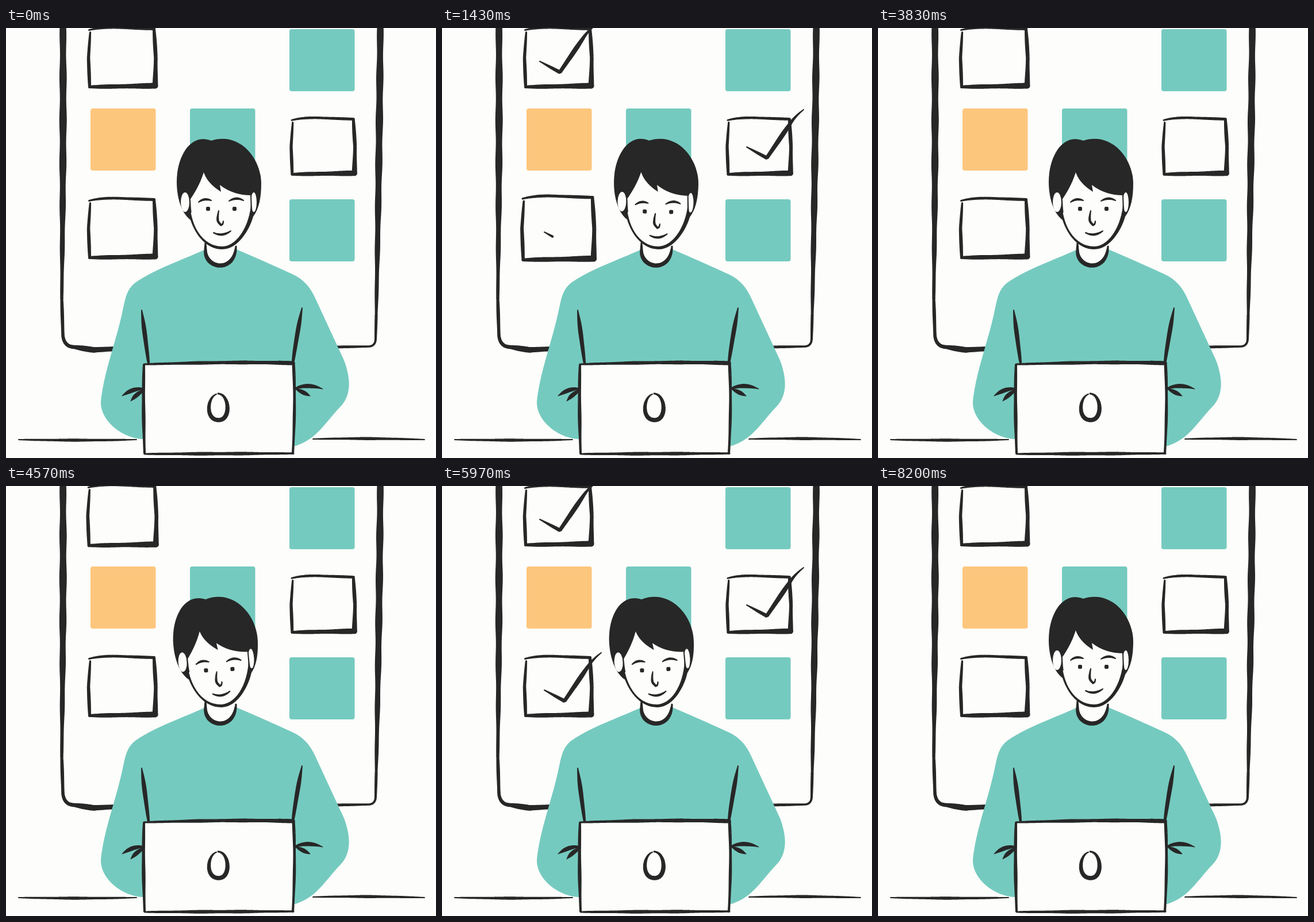
These frames come from a looping animation (748 px wide and 748 px high, 8230 ms). An HTML page:

```html
<!DOCTYPE html>
<html lang="en">
<head>
<meta charset="utf-8">
<title>Checking off tasks</title>
<style>
  html, body { margin: 0; width: 100%; height: 100%; overflow: hidden; background: #fdfdfb; }
  svg { display: block; width: 100%; height: 100%; }
</style>
</head>
<body>
<svg id="stage" viewBox="0 0 748 748"></svg>
<script>
const INK = '#272727', PAPER = '#fdfdfb', TEAL = '#75cabf', ORANGE = '#fdc67d';
const CYCLE = 4115, STAGGER = 400, DRAW = 330;
const stage = document.getElementById('stage');

function add(parent, tag, attrs = {}) {
  const node = document.createElementNS('http://www.w3.org/2000/svg', tag);
  for (const key in attrs) node.setAttribute(key, attrs[key]);
  parent.append(node);
  return node;
}
const shape = (parent, d, fill) => add(parent, 'path', { d, fill });
const note = (x, y, fill) => add(stage, 'rect', { x, y, width: 113.5, height: 108, rx: 4, fill });

// Ink line along a path: width swells from start to middle to end, with a slight waver.
// part draws only the first share of its length.
const probe = document.createElementNS('http://www.w3.org/2000/svg', 'path');
function inkLine(d, start, middle, end, part = 1) {
  probe.setAttribute('d', d);
  const length = probe.getTotalLength();
  const steps = Math.max(4, Math.ceil(length * part / 3));
  let out = '', last;
  for (let i = 0; i <= steps; i++) {
    const u = part * i / steps;
    const { x, y } = probe.getPointAtLength(u * length);
    const tip = u < 0.5 ? start : end;
    const width = (tip + (middle - tip) * Math.sin(Math.PI * u)) * (1 + 0.08 * Math.sin(u * length / 12));
    const r = width / 2;
    out += `M${x - r} ${y}a${r} ${r} 0 1 0 ${2 * r} 0a${r} ${r} 0 1 0 ${-2 * r} 0Z`;
    if (last) {
      const gap = Math.hypot(x - last.x, y - last.y) || 1;
      const nx = (last.y - y) / gap, ny = (x - last.x) / gap, q = last.r;
      out += `M${last.x + nx * q} ${last.y + ny * q}L${x + nx * r} ${y + ny * r}`
           + `L${x - nx * r} ${y - ny * r}L${last.x - nx * q} ${last.y - ny * q}Z`;
    }
    last = { x, y, r };
  }
  return out;
}
const ink = (parent, d, start, middle, end) => shape(parent, inkLine(d, start, middle, end), INK);

function drawBoard() {
  ink(stage, 'M98 -160Q101 150 97 470', 8, 12, 5);
  ink(stage, 'M97 470L99 535Q101 554 118 555', 5, 6, 6);
  ink(stage, 'M112 554L152 560L190 558', 5, 10, 8);
  ink(stage, 'M652 -160Q651 150 644 500', 8, 12, 5);
  ink(stage, 'M644 500L643 540Q643 554 630 554L570 555', 5, 4, 5);
  note(147, 140, ORANGE);
  note(320, 140, TEAL);
  note(493, 2, TEAL);
  note(493, 298, TEAL);
}

function drawBox() {
  const box = add(stage, 'g');
  ink(box, 'M-58 -48Q-35 -54 0 -52L55 -50', 3, 5, 5);
  ink(box, 'M55 -50L58 0L57 49', 5, 7, 9);
  ink(box, 'M57 49L-57 51', 10, 8, 5);
  ink(box, 'M-57 51L-59 0L-56 -44', 5, 6, 3);
  return box;
}

function drawBody() {
  ink(stage, 'M22 716Q130 718 227 716', 2, 5, 2);
  ink(stage, 'M534 715Q630 713 728 716', 2, 5, 2);
  shape(stage, `M345 386C300 406 258 420 225 443C208 456 207 475 202 496C190 550 170 600 165 650
    C164 685 205 715 240 715L503 727C540 716 552 690 585 655C600 636 600 610 588 578
    L538 470C528 448 516 437 500 429Q450 406 403 386Z`, TEAL);
  const neck = 'M347 374L347 390C350 420 398 425 400 380';
  shape(stage, neck, PAPER);
  ink(stage, neck, 3, 8, 3);
  ink(stage, 'M236 491L248 583', 2, 8, 4);
  ink(stage, 'M515 487Q504 545 499 583', 2, 8, 4);
  ink(stage, 'M202 640Q222 626 238 628', 1, 7, 4);
  ink(stage, 'M217 649Q226 638 238 631', 1, 7, 4);
  ink(stage, 'M503 627Q525 618 551 628', 3, 7, 1);
  ink(stage, 'M505 628L529 640', 3, 7, 1);
}

function drawLaptop() {
  shape(stage, 'M240 584L500 582L500 740L242 740Z', PAPER);
  ink(stage, 'M240 586Q238 650 241 740', 4, 6, 4);
  ink(stage, 'M240 585Q400 580 499 583', 3, 6, 7);
  ink(stage, 'M500 583Q504 650 499 740', 5, 5, 4);
  ink(stage, 'M242 741L500 740', 3, 6, 3);
  ink(stage, 'M366 637C350 642 346 682 370 682C392 682 389 637 369 636', 2, 8, 3);
}

function drawHead() {
  const head = add(stage, 'g');
  shape(head, `M357 196C320 182 297 225 297 268C297 295 305 322 321 334C330 362 350 385 376 385
    C404 385 424 350 430 328C440 315 444 295 444 271C444 225 405 180 357 196Z`, INK);
  for (const [cx, rx] of [[311.5, 7.5], [431, 5]])
    add(head, 'ellipse', { cx, cy: 303, rx, ry: 17, fill: PAPER });
  shape(head, `M344 251C338 270 330 284 320 299C319 340 340 380 376 380C406 379 428 335 427 291
    Q395 291 372 273L374 285Q350 270 344 251Z`, PAPER);
  ink(head, 'M320 299L321 320', 2, 2, 3);
  ink(head, 'M426 291L427 319', 2, 2, 3);
  const face = add(head, 'g');
  ink(face, 'M335 303Q345 295 357 300', 2, 4, 2);
  ink(face, 'M388 301Q401 293 413 300', 2, 4, 2);
  for (const x of [348, 394])
    add(face, 'rect', { x, y: 311, width: 7, height: 7, rx: 2, fill: INK });
  ink(face, 'M370 318Q367 332 369 337L374 343Q378 342 378 336', 2, 4, 2);
  ink(face, 'M361 356Q376 364 391 353', 2, 4, 2);
  return { head, face };
}

drawBoard();
const CHECK = 'M178 355L213 374L256 311Q264 300 277 290';
const tasks = [
  { x: 202.5, y: 51.5, size: 1, tickAt: '-8 -297' },
  { x: 552, y: 206, size: 0.95, tickAt: '352 -148' },
  { x: 202.5, y: 348.5, size: 1, tickAt: '0 0' }
].map((task, i) => ({
  ...task,
  start: 559 + STAGGER * i,
  clear: 2200 + STAGGER * i,
  box: drawBox(),
  tick: add(stage, 'path', { fill: INK, transform: `translate(${task.tickAt})` })
}));
drawBody();
drawLaptop();
const { head, face } = drawHead();

function ease(t, from, to) {
  const u = Math.min(1, Math.max(0, (t - from) / (to - from)));
  return (1 - Math.cos(Math.PI * u)) / 2;
}

function render(time) {
  const t = time % CYCLE;
  for (const { x, y, size, start, clear, box, tick } of tasks) {
    const beat = Math.min(1, Math.max(0, (t - start + 133) / 333));
    const scale = size * (1 + 0.08 * Math.sin(Math.PI * beat));
    box.setAttribute('transform', `translate(${x} ${y}) scale(${scale})`);
    const part = ease(t, start, start + DRAW) - ease(t, clear, clear + DRAW);
    tick.setAttribute('d', part > 0.002 ? inkLine(CHECK, 2, 8, 2, part) : '');
  }
  // Glance left, right, left again, then back to the middle.
  const rest = ease(t, 2200, 3000);
  const angle = -3 * ease(t, 0, 450) + 8 * ease(t, 680, 1100) - 8 * ease(t, 1180, 1680) + 3 * rest;
  head.setAttribute('transform', `rotate(${angle} 374 388)`);
  face.setAttribute('transform', `translate(0 ${5 * (ease(t, 0, 450) - rest)})`);
}

let origin;
function frame(now) {
  origin ??= now;
  render(now - origin);
  requestAnimationFrame(frame);
}
render(0);
requestAnimationFrame(frame);
</script>
</body>
</html>
```
